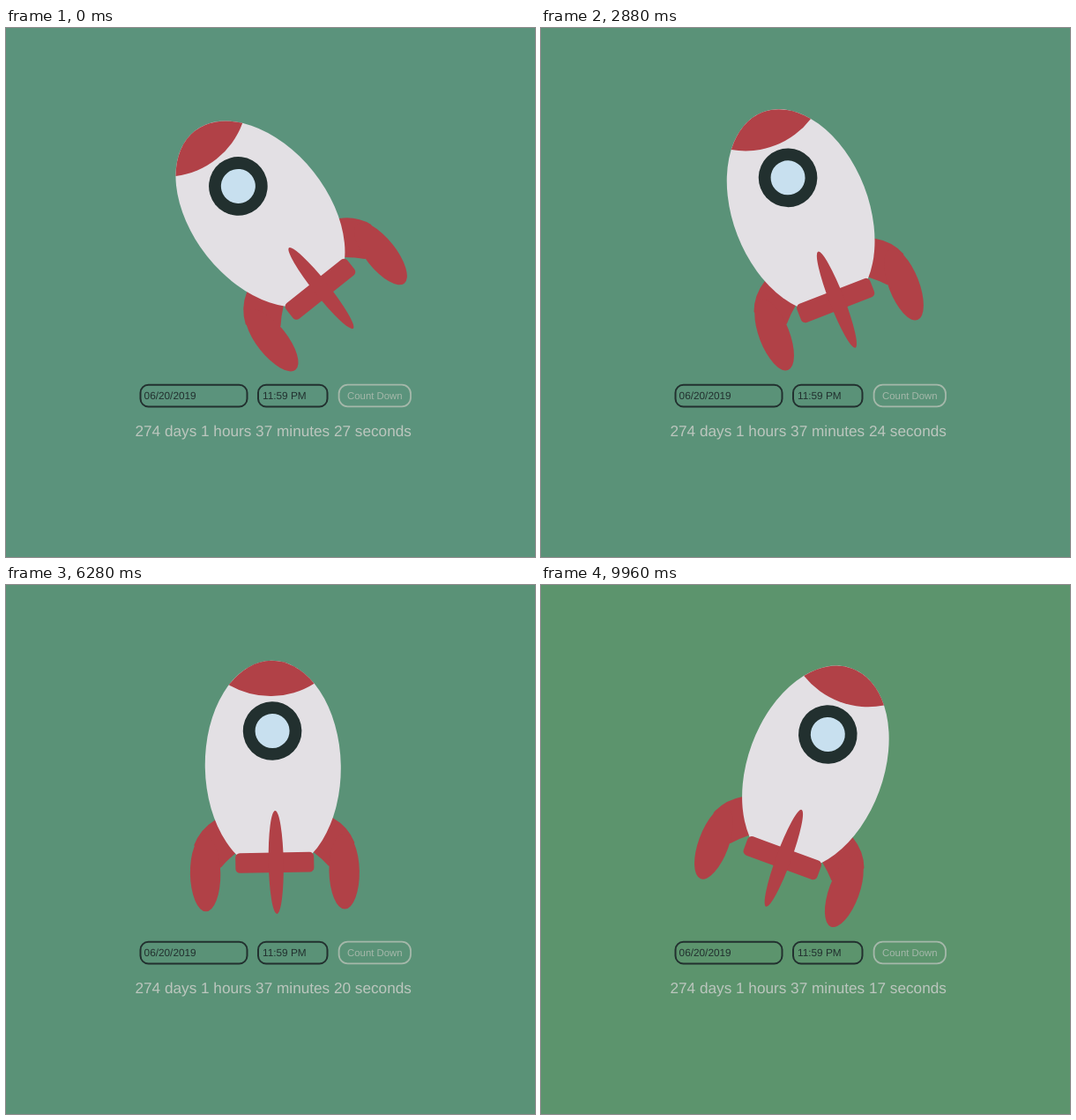
Animation, 600 px wide and 600 px high, one loop 10000 ms. Source, as an HTML page:

```html
<!DOCTYPE html>
<html lang="en">
<head>
<meta charset="utf-8">
<title>Rocket countdown</title>
<style>
  html, body { margin: 0; width: 100%; height: 100%; overflow: hidden; background: #5b937c; }
  svg { display: block; width: 100vw; height: 100vh; }
  text { font-family: "Liberation Sans", Arial, sans-serif; text-rendering: geometricPrecision; }
  .red { fill: #b14147; }
  .dark { fill: #22302f; }
  .field { fill: none; stroke: #22302f; stroke-width: 2; }
  .button { fill: none; stroke: #a5b8aa; stroke-width: 1.8; }
</style>
</head>
<body>
<svg viewBox="0 0 600 600">
  <defs>
    <g id="leg" class="red">
      <path d="M50 25L67 36Q84 46 91 64L80 92L61 90Q54 82 44 74Z"/>
      <ellipse cx="78.8" cy="96.5" rx="17.2" ry="43"/>
    </g>
  </defs>
  <rect id="sky" width="600" height="600"/>
  <g id="rocket">
    <use href="#leg"/>
    <use href="#leg" transform="scale(-1 1)"/>
    <ellipse cy="-23.7" rx="77" ry="120" fill="#e3e0e4"/>
    <path class="red" d="M-48.4 -117A93 93 0 0 0 48.4 -117A77 120 0 0 0 -48.4 -117Z"/>
    <circle class="dark" cy="-64" r="33.3"/>
    <circle cy="-64" r="19.5" fill="#c8e0ef"/>
    <rect class="red" x="-44.4" y="74" width="89" height="22.7" rx="5"/>
    <ellipse class="red" cx="1.6" cy="85" rx="8.5" ry="58.5"/>
  </g>
  <rect class="field" x="152.5" y="404.7" width="121" height="24.8" rx="9"/>
  <rect class="field" x="286" y="404.7" width="78.5" height="24.8" rx="9"/>
  <rect class="button" x="377.6" y="404.7" width="81.4" height="24.6" rx="10"/>
  <text class="dark" x="156.6" y="421" font-size="11.8">06/20/2019</text>
  <text class="dark" x="291" y="421" font-size="11.8">11:59 PM</text>
  <text x="418.3" y="421" font-size="11.35" text-anchor="middle" fill="#a5b8aa">Count Down</text>
  <text id="clock" x="303.2" y="463" font-size="17.2" text-anchor="middle" fill="#bcc6be"></text>
</svg>
<script>
  const LOOP = 10000, FIRST_TICK = 140;
  const sky = document.getElementById('sky');
  const rocket = document.getElementById('rocket');
  const clock = document.getElementById('clock');

  // [time, degrees]
  const tilt = [[0, -38.5], [1760, -27.9], [2880, -21.2], [4560, -12],
                [6280, -1], [8520, 12.8], [10000, 20.4]];
  // [time, r, g, b]
  const tint = [[0, 91, 147, 124], [1760, 90, 146, 120], [6280, 90, 146, 119],
                [8520, 91, 147, 111], [10000, 92, 148, 109]];

  function sample(steps, t) {
    const i = Math.max(1, steps.findIndex(s => s[0] > t));
    const a = steps[i - 1], b = steps[i];
    const k = (t - a[0]) / (b[0] - a[0]);
    return a.slice(1).map((v, j) => v + (b[j + 1] - v) * k);
  }

  function draw(t) {
    const [angle] = sample(tilt, t);
    rocket.setAttribute('transform', `translate(303.2 229.5) rotate(${angle})`);
    sky.setAttribute('fill', `rgb(${sample(tint, t).map(Math.round)})`);
    const left = 26 - Math.floor((t - FIRST_TICK) / 1000);
    const label = `274 days 1 hours 37 minutes ${left} seconds`;
    if (clock.textContent !== label) clock.textContent = label;
  }

  const start = performance.now();
  function tick() {
    draw((performance.now() - start) % LOOP);
    requestAnimationFrame(tick);
  }
  tick();
</script>
</body>
</html>
```
